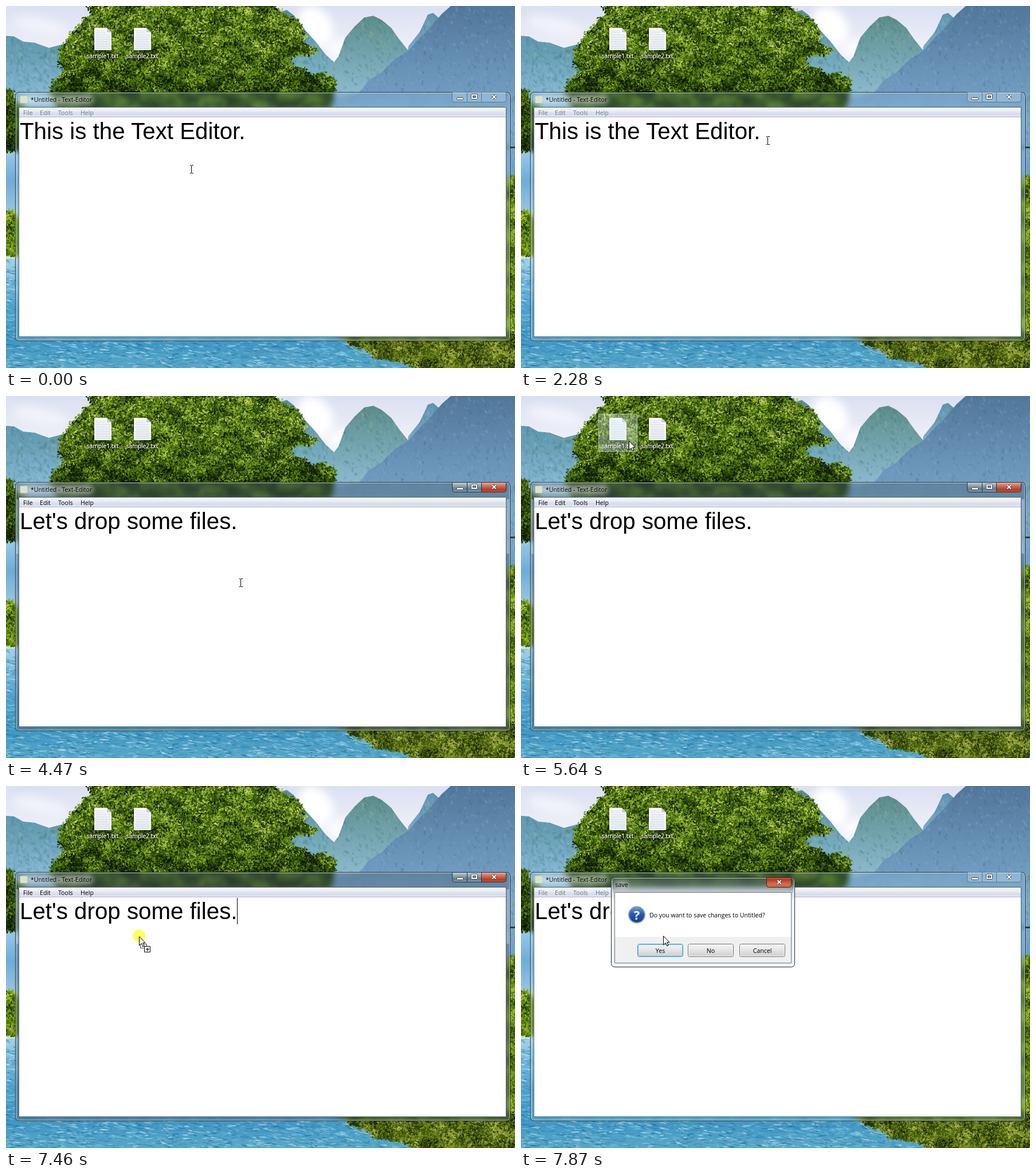
These frames come from a looping animation (888x631 px, 7990 ms). An HTML page with a canvas:

```html
<!DOCTYPE html>
<html lang="en">
<head>
<meta charset="utf-8">
<title>Text editor</title>
<style>
  html, body { margin: 0; width: 100%; height: 100%; overflow: hidden; }
  canvas { display: block; width: 888px; height: 631px; }
</style>
</head>
<body>
<canvas id="stage" width="888" height="631"></canvas>
<script>
const W = 888, H = 631, LOOP = 7990;
const UI = '"Open Sans", "Noto Sans", sans-serif';
const ctx = document.getElementById('stage').getContext('2d');

let seed = 7;
const rnd = () => {
  seed = (seed * 1664525 + 1013904223) >>> 0;
  return seed / 4294967296;
};
const shape = points => new Path2D(`M${points}Z`);

function layer(draw) {
  const canvas = document.createElement('canvas');
  canvas.width = W;
  canvas.height = H;
  draw(canvas.getContext('2d'));
  return canvas;
}

function gradient(c, y0, y1, ...colors) {
  const g = c.createLinearGradient(0, y0, 0, y1);
  colors.forEach((color, i) => g.addColorStop(i / (colors.length - 1), color));
  return g;
}

function label(c, text, x, y, size = 10.6, color = '#000', align = 'left') {
  c.font = `${size}px ${UI}`;
  c.textAlign = align;
  c.fillStyle = color;
  c.fillText(text, x, y);
  c.textAlign = 'left';
}

function box(c, x, y, w, h, r, fill, stroke) {
  c.beginPath();
  c.roundRect(x, y, w, h, r);
  if (fill) { c.fillStyle = fill; c.fill(); }
  if (stroke) { c.strokeStyle = stroke; c.lineWidth = 1; c.stroke(); }
}

// ---- landscape ----

function dab(c, x, y, w, h, angle, color) {
  c.fillStyle = color;
  c.beginPath();
  c.ellipse(x, y, w, h, angle, 0, 7);
  c.fill();
}

function ridge(c, points, y0, y1, colors, marks) {
  const path = shape(points);
  c.save();
  c.fillStyle = gradient(c, y0, y1, ...colors);
  c.fill(path);
  c.clip(path);
  for (let i = 0; i < 5000; i++) {
    c.globalAlpha = 0.06 + rnd() * 0.2;
    dab(c, rnd() * W, y0 + rnd() * (y1 - y0), 1 + rnd() * 4, 0.8 + rnd() * 1.6,
      0.7 + rnd(), marks[i % marks.length]);
  }
  c.restore();
}

// Leaves scattered over a shape; shade darkens them towards the bottom.
function foliage(c, points, [x0, y0, w, h], count, colors, shade = 0) {
  const path = shape(points);
  c.fillStyle = colors[1];
  c.fill(path);
  for (let i = 0; i < count; i++) {
    const x = x0 + rnd() * w, y = y0 + rnd() * h;
    if (!c.isPointInPath(path, x, y)) continue;
    const light = Math.sin(x / 13 + 2 * Math.sin(y / 17)) + Math.sin(y / 8 + 2 * Math.sin(x / 19));
    const level = rnd() * 0.72 + (light + 2) * 0.08 - shade * ((y - y0) / h) ** 2;
    const color = colors[Math.max(0, Math.min(colors.length - 1, Math.floor(level * colors.length)))];
    for (let k = 0; k < 4; k++)
      dab(c, x + rnd() * 12 - 6, y + rnd() * 8 - 4, 0.8 + rnd() * 1.8, 0.6 + rnd() * 0.8, rnd() * 3, color);
  }
}

const landscape = layer(c => {
  c.fillStyle = gradient(c, 0, 150, '#dbe0f2', '#eef0f8', '#e3ecf6');
  c.fillRect(0, 0, W, H);
  c.filter = 'blur(8px)';
  dab(c, 540, 35, 28, 38, -0.6, '#fff');
  dab(c, 590, 75, 30, 18, 0, '#fbfbff');
  dab(c, 60, 35, 50, 14, 0.2, '#f1f2fa');
  c.filter = 'none';

  const haze = ['#3d6d83', '#93c0d2', '#47796f'];
  ridge(c, '0,52 14,53 30,62 50,64 75,73 105,65 160,60 160,260 0,260', 50, 200,
    ['#5f98ae', '#70a8c2', '#8fc0dd'], haze);
  ridge(c, '0,86 22,80 48,84 72,74 105,66 160,90 160,180 0,180', 66, 180,
    ['#6299a9', '#78adc8', '#8fbfda'], haze);
  ridge(c, '470,12 490,7 502,16 520,40 540,62 558,85 572,98 590,180 440,180', 6, 180,
    ['#578aa0', '#72a9ba', '#8cbdd2'], haze);
  ridge(c, '702,70 722,45 736,15 745,12 760,25 800,90 800,160 690,160', 12, 160,
    ['#5f92ad', '#7facca', '#90bcda'], haze);
  ridge(c, '555,150 563,110 580,88 592,55 608,36 625,20 641,17 655,24 672,38 686,58 702,78 720,110 740,180 555,180',
    16, 180, ['#5b8a88', '#6d9fa6', '#83b1c4', '#93c0dd'], ['#3b6b6d', '#98bb92', '#74a4b0']);
  ridge(c, '618,150 632,130 655,116 678,93 702,78 722,55 740,38 760,14 776,0 888,0 888,310 560,310 560,160',
    0, 310, ['#51779a', '#6791b5', '#7ba7cd', '#6c9dca'], ['#3a617f', '#92b3c9', '#5585a0']);

  c.fillStyle = gradient(c, 250, 360, '#9bcbe9', '#6eacd9', '#9ac6e0');
  c.fillRect(0, 250, 30, 110);
  const leaves = ['#0d1a04', '#1a2e07', '#2c4a0a', '#456a10', '#618918', '#81a527', '#a9c248', '#c3d56c'];
  foliage(c, '145,0 150,13 139,23 125,38 108,59 95,76 94,100 106,115 86,130 78,150 92,180 564,180 572,148 575,130 552,117 532,122 520,109 500,104 490,95 506,85 530,84 543,76 518,63 522,48 505,23 488,18 467,0',
    [70, 0, 510, 180], 12000, leaves, 0.3);
  foliage(c, '0,145 11,147 14,165 30,175 30,252 0,252', [0, 145, 30, 107], 450, leaves.slice(0, 6), 0.3);
  const shrubs = ['#203807', '#3b5c0a', '#5e850d', '#82aa18', '#abc636'];
  foliage(c, '0,356 14,360 30,380 30,433 0,435', [0, 355, 30, 80], 450, shrubs);
  foliage(c, '872,300 888,296 888,600 868,600', [866, 296, 22, 304], 1000, shrubs);
  c.fillStyle = '#263f3d';
  c.fillRect(872, 245, 16, 3);

  c.fillStyle = gradient(c, 438, 631, '#a9d4e8', '#70b6da', '#4a9fcd', '#4097c3', '#58a7c8');
  c.fillRect(0, 438, 866, 193);
  c.fillStyle = '#d7e8e4';
  c.fillRect(0, 438, 30, 2);
  for (let i = 0; i < 5200; i++) {
    c.globalAlpha = 0.15 + rnd() * 0.5;
    dab(c, rnd() * 700, 440 + rnd() * 191, 1.5 + rnd() * 7, 0.4 + rnd() * 0.8, rnd() * 0.4 - 0.1,
      ['#1c6c9d', '#8fd0e7', '#2a7eaf', '#e0f3f6'][i % 4]);
  }
  c.globalAlpha = 1;
  foliage(c, '575,570 605,590 632,600 645,612 690,619 715,631 888,631 888,570',
    [575, 570, 313, 61], 4200, ['#141f06', '#293b08', '#425a0d', '#5f7616', '#829329', '#a9b150']);
  c.strokeStyle = '#c6d6bd';
  c.beginPath();
  c.moveTo(592, 586);
  c.quadraticCurveTo(610, 605, 632, 606);
  c.stroke();

  fileIcon(c, 154, 'sample1.txt');
  fileIcon(c, 223, 'sample2.txt');
});

function fileIcon(c, x, name) {
  c.save();
  c.shadowColor = 'rgba(0,0,0,.5)';
  c.shadowBlur = 3;
  c.fillStyle = gradient(c, 38, 77, '#fff', '#edf2f6');
  c.fill(shape(`${x},38 ${x + 22},38 ${x + 30},46 ${x + 30},77 ${x},77`));
  c.shadowBlur = 0;
  c.fillStyle = '#c3ced7';
  c.fill(shape(`${x + 22},38 ${x + 22},46 ${x + 30},46`));
  c.fillStyle = '#c9d3dc';
  for (let y = 43; y < 75; y += 3) c.fillRect(x + 3, y, y < 47 ? 17 : 24, 1);
  c.shadowColor = '#000';
  c.shadowBlur = 3;
  c.shadowOffsetX = c.shadowOffsetY = 1;
  label(c, name, x + 14.5, 91, 10.2, '#fff', 'center');
  label(c, name, x + 14.5, 91, 10.2, '#fff', 'center');
  c.restore();
}

// ---- windows ----

function glass(c, backdrop, x, y, w, h, blur, tint) {
  c.save();
  c.beginPath();
  c.roundRect(x, y, w, h, 6);
  c.clip();
  c.filter = `blur(${blur}px)`;
  c.drawImage(backdrop, 0, 0);
  c.filter = 'none';
  c.fillStyle = tint;
  c.fillRect(x, y, w, h);
  c.restore();
  box(c, x + 1.5, y + 1.5, w - 3, h - 3, 5, null, 'rgba(255,255,255,.65)');
  box(c, x + 0.5, y + 0.5, w - 1, h - 1, 6, null, '#1c2c35');
}

function halo(c, x, y, w, h) {
  c.save();
  c.filter = 'blur(5px)';
  box(c, x, y, w, h, 6, 'rgba(255,255,255,.5)');
  c.restore();
}

function cross(c, x, y, s = 3) {
  for (const [color, width] of [['#3c4850', 4], ['#fff', 2]]) {
    c.strokeStyle = color;
    c.lineWidth = width;
    c.beginPath();
    c.moveTo(x - s, y - s); c.lineTo(x + s, y + s);
    c.moveTo(x + s, y - s); c.lineTo(x - s, y + s);
    c.stroke();
  }
}

const closeRed = c => gradient(c, 151, 170, '#e4a99c', '#ce6a55', '#b83921', '#d3694d');

function editorWindow(active) {
  return layer(c => {
    c.drawImage(landscape, 0, 0);
    glass(c, landscape, 16, 150, 864, 434, 4,
      active ? 'rgba(75,95,112,.38)' : 'rgba(150,205,230,.16)');
    if (active) {
      c.fillStyle = 'rgba(200,228,242,.4)';
      c.fillRect(18, 180, 5, 95);
      c.fillRect(873, 180, 5, 95);
    }
    halo(c, 22, 156, 130, 15);
    c.fillStyle = '#dfe3c4';
    c.fillRect(25, 157, 12, 12);
    label(c, '*Untitled - Text-Editor', 43, 167);

    const buttons = new Path2D();
    buttons.roundRect(778.5, 150.5, 94, 17, [0, 0, 4, 4]);
    c.save();
    c.clip(buttons);
    c.fillStyle = active
      ? gradient(c, 151, 168, '#c0cdd4', '#90a3ae', '#60798a', '#8ba5b3')
      : 'rgba(200,226,241,.3)';
    c.fillRect(778, 150, 95, 18);
    if (active) { c.fillStyle = closeRed(c); c.fillRect(830, 150, 43, 18); }
    c.restore();
    c.lineWidth = 1;
    c.strokeStyle = active ? '#263640' : '#60798a';
    c.stroke(buttons);
    c.fillStyle = c.strokeStyle;
    c.fillRect(804, 151, 1, 16);
    c.fillRect(829, 151, 1, 16);
    box(c, 786.5, 159.5, 11, 4, 1, '#fff', '#3c4850');
    box(c, 811.5, 153.5, 11, 9, 1, '#fff', '#3c4850');
    box(c, 814.5, 156.5, 5, 3, 0, '#8098a5', '#3c4850');
    cross(c, 851.5, 158.5);

    box(c, 22.5, 176.5, 850, 400, 0, '#fff', '#495e69');
    c.fillStyle = gradient(c, 177, 194, '#fdfdff', '#eaedf6', '#d6dbec', '#e5e9f5');
    c.fillRect(23, 177, 849, 17);
    c.fillStyle = '#aeb4c6';
    c.fillRect(23, 193, 849, 1);
    const ink = active ? '#000' : '#6c8079';
    [['File', 30], ['Edit', 59], ['Tools', 91], ['Help', 130]]
      .forEach(([text, x]) => label(c, text, x, 190, 10.6, ink));
  });
}

const activeWindow = editorWindow(true);
const idleWindow = editorWindow(false);

function drawDialog(c) {
  glass(c, idleWindow, 157, 159, 321, 157, 4, 'rgba(190,212,222,.28)');
  c.fillStyle = gradient(c, 160, 186, 'rgba(30,45,38,.45)', 'rgba(90,105,105,.2)');
  c.fillRect(160, 161, 315, 25);
  halo(c, 162, 166, 26, 12);
  label(c, 'save', 164.5, 176);
  box(c, 428.5, 159.5, 43, 17, [0, 0, 4, 4], closeRed(c), '#45221d');
  cross(c, 450.5, 167.5);
  box(c, 163.5, 185.5, 308, 123, 0, '#fff', '#68777e');
  c.fillStyle = '#f0f0f0';
  c.fillRect(164, 263, 307, 45);
  c.beginPath();
  c.arc(202, 224.5, 14, 0, 7);
  c.fillStyle = gradient(c, 210, 239, '#6c9be0', '#2456b5', '#173c91');
  c.fill();
  c.strokeStyle = '#8d9ab0';
  c.lineWidth = 2;
  c.stroke();
  c.font = 'bold 22px "Open Sans", sans-serif';
  c.textAlign = 'center';
  c.fillStyle = '#fff';
  c.fillText('?', 202, 232.5);
  label(c, 'Do you want to save changes to Untitled?', 224, 228.5, 10.5);
  [['Yes', 203.5, '#3c9bd0'], ['No', 291.5, '#707070'], ['Cancel', 381.5, '#707070']]
    .forEach(([text, x, edge]) => {
      box(c, x, 275.5, 79, 22, 3, gradient(c, 276, 297, '#f3f3f3', '#ebebeb', '#dcdcdc', '#cfcfcf'), edge);
      box(c, x + 1, 276.5, 77, 20, 2, null, text === 'Yes' ? '#6cc8f0' : '#fafafa');
      label(c, text, x + 39.5, 290.5, 10.6, '#000', 'center');
    });
}

// ---- pointers ----

function beam(c, x, y) {
  c.fillStyle = '#000';
  c.fillRect(x, y - 6, 1, 13);
  for (const row of [y - 7, y + 7]) {
    c.fillRect(x - 2, row, 2, 1);
    c.fillRect(x + 1, row, 3, 1);
  }
}

function arrow(c, x, y) {
  c.save();
  c.translate(x + 0.5, y + 0.5);
  const path = shape('0,0 0,15.5 3.8,12 6.3,17.5 8.5,16.5 6.2,11 10.5,11');
  c.fillStyle = '#fff';
  c.fill(path);
  c.strokeStyle = '#000';
  c.lineWidth = 1;
  c.stroke(path);
  c.restore();
}

function dragArrow(c, x, y) {
  dab(c, x, y - 1, 11, 11, 0, '#ffff64');
  c.setLineDash([2, 1]);
  box(c, x + 2.5, y + 13.5, 11, 7, 0, null, '#000');
  c.setLineDash([]);
  arrow(c, x, y);
  box(c, x + 9.5, y + 17.5, 10, 10, 0, '#fff', '#000');
  c.fillStyle = '#000';
  c.fillRect(x + 12, y + 22, 6, 1);
  c.fillRect(x + 14, y + 20, 1, 6);
}

function clickBeam(c, x, y) {
  dab(c, x, y, 11.5, 11.5, 0, '#ffff64');
  beam(c, x, y);
}

// ---- timeline: each entry holds until the next ----

const pointer = [
  [0, 323, 284, beam], [130, 317, 272, beam], [240, 300, 299, beam], [350, 278, 340, beam],
  [460, 266, 362, beam], [610, 274, 378, beam], [730, 288, 404, beam], [860, 298, 419, beam],
  [1510, 285, 364, beam], [1630, 272, 316, beam], [1780, 292, 308, beam], [1900, 335, 286, beam],
  [2030, 382, 260, beam], [2150, 416, 241, beam], [2280, 430, 234, beam],
  [2400, 428, 226, clickBeam], [2670, 429, 236, beam], [2790, 431, 280, beam],
  [2920, 432, 317, beam], [3070, 428, 323, beam], [3220, 425, 324, beam],
  [3460, 420, 325, beam], [3700, 416, 325, beam], [3950, 414, 325, beam],
  [4070, 413, 325, beam], [4220, 411, 325, beam], [4470, 409, 325, beam],
  [5000, 404, 322, beam], [5060, 378, 302, beam], [5120, 345, 278, beam],
  [5260, 290, 218, beam], [5390, 240, 143, arrow], [5520, 206, 102, arrow],
  [5640, 188, 78, arrow], [5770, 180, 69, arrow], [5920, 178, 67, arrow],
  [6020, 177, 66, arrow], [6800, 176, 65, arrow], [6950, 174, 63, arrow],
  [7060, 192, 111, dragArrow], [7210, 207, 170, dragArrow], [7340, 220, 225, dragArrow],
  [7460, 232, 262, dragArrow], [7580, 245, 262, arrow], [7750, 247, 261, arrow],
  [7870, 248, 261, arrow]
];
const keyTimes = [3220, 3340, 3460, 3580, 3700, 3830, 3950];
const greeting = 'This is the Text Editor.';
const reply = "Let's drop some files.";

const held = (track, t) => track.findLast(entry => entry[0] <= t);
const within = (t, ...spans) => spans.some(([from, to]) => t >= from && t < to);

function editorText(t) {
  const keys = keyTimes.filter(time => time <= t).length;
  return keys ? reply.slice(0, Math.round(reply.length * keys / keyTimes.length)) : greeting;
}

function draw(t) {
  const active = within(t, [2400, 7060], [7210, 7580]);
  ctx.drawImage(active ? activeWindow : idleWindow, 0, 0);

  if (within(t, [5640, 7060]))
    box(ctx, 135.5, 31.5, 67, 65, 2, 'rgba(225,238,248,.33)', 'rgba(225,240,250,.65)');

  const [, x, y, paint] = held(pointer, t);
  if (paint === clickBeam) paint(ctx, x, y);

  const selected = within(t, [3070, 3220]);
  if (selected) {
    ctx.fillStyle = '#3399ff';
    ctx.fillRect(24, 195, 409, 46);
  }
  const text = editorText(t);
  ctx.font = '40.3px "Liberation Sans", Arial, sans-serif';
  ctx.fontKerning = 'normal';
  ctx.fillStyle = selected ? '#fff' : '#000';
  ctx.fillText(text, 24, 232);
  if (within(t, [2400, 3070], [3220, 4470], [5000, 5520], [6020, 6550], [7210, 7580])) {
    const end = 24 + Math.round(ctx.measureText(text).width);
    ctx.fillRect(end, 195, 1, 46);
  }
  ctx.fontKerning = 'auto';

  if (t >= 7750) drawDialog(ctx);
  if (paint !== clickBeam) paint(ctx, x, y);
}

const start = performance.now();
function tick() {
  draw((performance.now() - start) % LOOP);
  requestAnimationFrame(tick);
}
tick();
</script>
</body>
</html>
```
